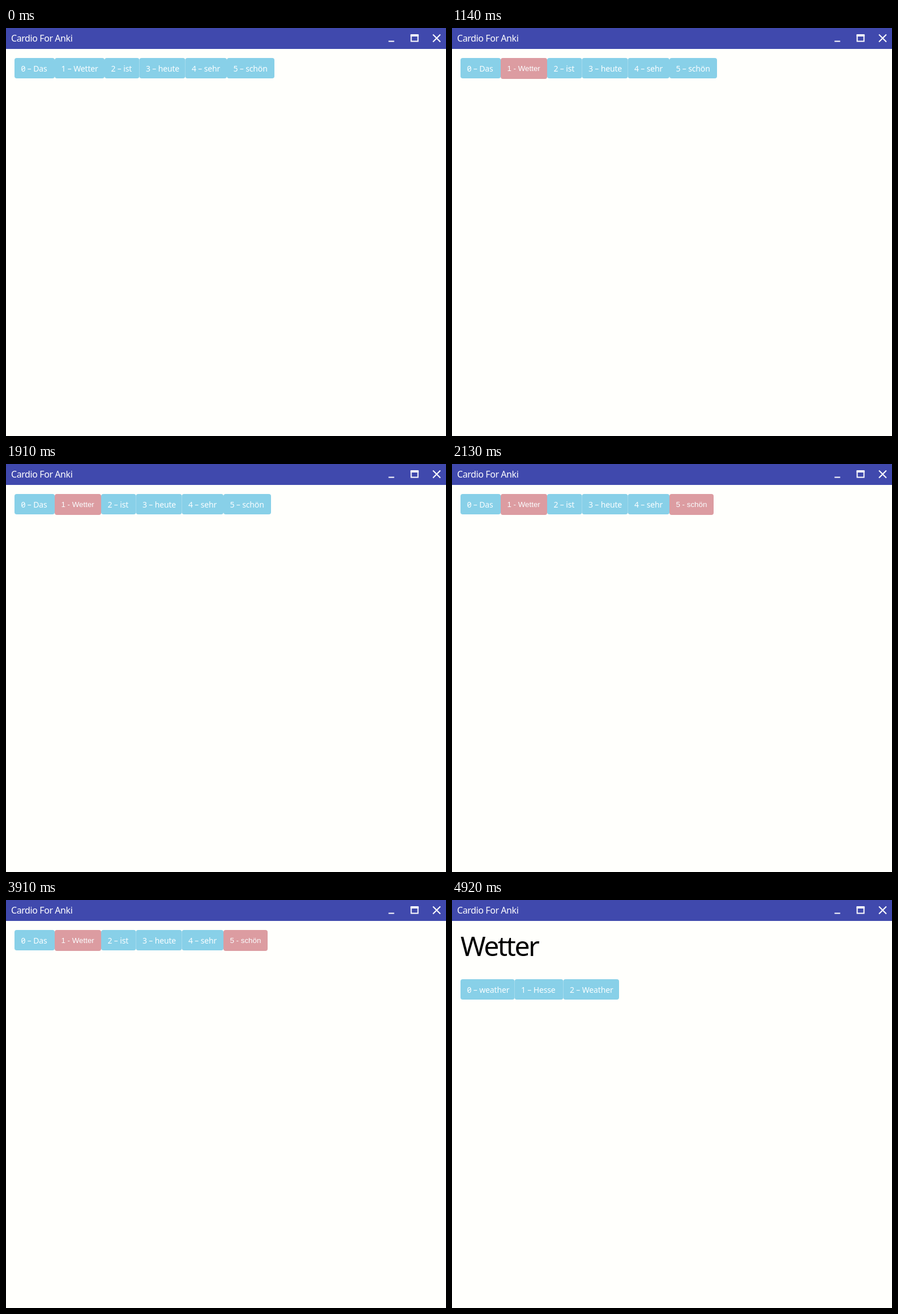
These frames come from a looping animation (777 px wide and 721 px high, 5.46 s). An HTML page:

```html
<!DOCTYPE html>
<html lang="en">
<head>
<meta charset="utf-8">
<title>Word picker</title>
<style>
  html, body { margin: 0; width: 100%; height: 100%; overflow: hidden; background: #fffffc; }
  svg { display: block; }
  text { font: 14px "Noto Sans", "Open Sans", sans-serif; letter-spacing: -.15px; fill: #fbfeff; font-variant-numeric: slashed-zero; }
  .title { font-size: 16px; letter-spacing: -.42px; fill: #fff; }
  .heading { font-size: 48px; letter-spacing: -2.5px; fill: #000; }
  .picked { font: 13.33px "Liberation Sans", Arial, sans-serif; letter-spacing: 0; }
</style>
</head>
<body>
<svg width="777" height="721" viewBox="0 0 777 721">
  <rect width="777" height="721" fill="#fffffc"/>
  <rect width="777" height="37" fill="#4049ad"/>
  <text class="title" x="9" y="23.5">Cardio For Anki</text>
  <g fill="none" stroke="#fff" stroke-width="2">
    <path d="M675.5 23.5h10M754 11.5l13 13M767 11.5l-13 13"/>
    <path d="M715.5 12v11.5h12V12"/>
    <path d="M714.5 13h14" stroke-width="4"/>
  </g>
  <g id="content"></g>
</svg>
<script>
const LOOP = 5460;
const content = document.getElementById('content');
const sentence = ['Das', 'Wetter', 'ist', 'heute', 'sehr', 'schön'];
const sentenceWidths = [71, 88, 61.5, 81, 73.5, 84];
const pickedWidths = { 1: 82, 5: 78 };
const meanings = ['weather', 'Hesse', 'Weather'];
const meaningWidths = [95.5, 86, 98.5];

// Lays buttons side by side; picked ones switch font, colour and width.
function buttonRow(words, widths, y, picked = []) {
  let x = 15;
  return words.map((word, i) => {
    const on = picked.includes(i);
    const width = on ? pickedWidths[i] : widths[i];
    const button = `<rect x="${x}" y="${y}" width="${width}" height="${on ? 37 : 36}" rx="4" fill="${on ? '#dc9ca1' : '#88d0e8'}"/>
      <text class="${on ? 'picked' : ''}" x="${x + 11.5}" y="${y + (on ? 22.5 : 23.5)}">${i} ${on ? '-' : '–'} ${word}</text>`;
    x += width;
    return button;
  }).join('');
}

const pick = (...picked) => buttonRow(sentence, sentenceWidths, 53, picked);
const scenes = [
  { start: 0, markup: pick() },
  { start: 1140, markup: pick(1) },
  { start: 2020, markup: pick(1, 5) },
  { start: 4340, markup: '<text class="heading" x="15" y="99">Wetter</text>' + buttonRow(meanings, meaningWidths, 140) }
];

let shown;
const origin = performance.now();
function draw() {
  const time = (performance.now() - origin) % LOOP;
  const scene = scenes.findLast(s => s.start <= time) || scenes[0];
  if (scene !== shown) content.innerHTML = (shown = scene).markup;
  requestAnimationFrame(draw);
}
draw();
</script>
</body>
</html>
```
